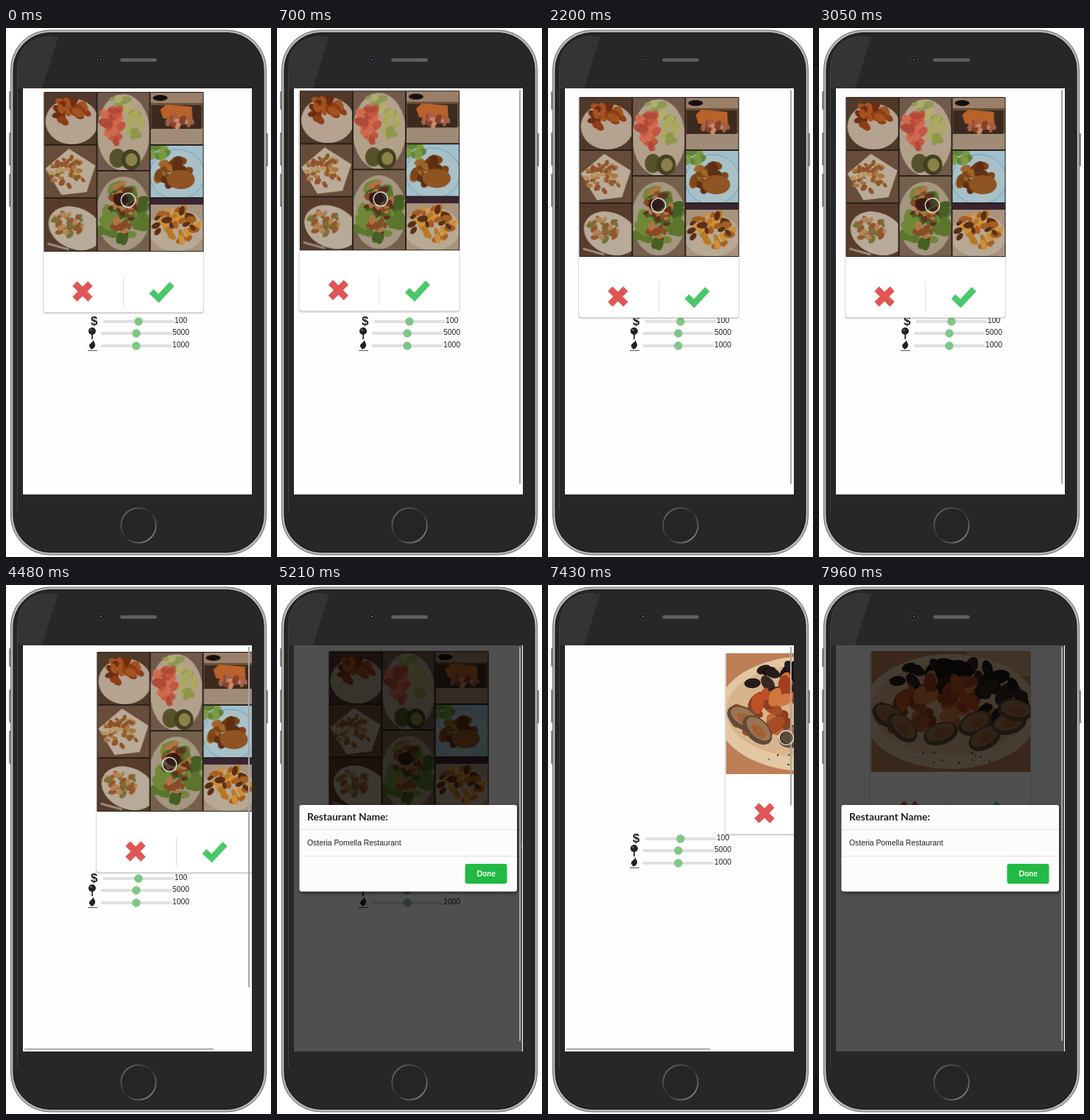
Animation of 360x719 px, one loop 8 s. Source, as an HTML page:

```html
<!DOCTYPE html>
<html lang="en">
<head>
<meta charset="utf-8">
<title>Swipe cards</title>
<style>
  html, body { margin: 0; width: 100%; height: 100%; overflow: hidden; background: #fff; }
  svg { display: block; }
  text { font: 10.4px "Liberation Sans", Arial, sans-serif; fill: #222; }
  .bold { font: bold 13.8px Lato, sans-serif; }
</style>
</head>
<body>
<svg id="stage" width="360" height="719" viewBox="0 0 360 719"></svg>
<script>
const LOOP = 8000, DIM = 0.69, REST_X = 69;
const SECOND_CARD = 6160;

// Shape helpers
const rect = (x, y, w, h, fill, more = '') =>
  `<rect x="${x}" y="${y}" width="${w}" height="${h}" fill="${fill}" ${more}/>`;
const oval = (x, y, rx, ry, fill, more = '') =>
  `<ellipse cx="${x}" cy="${y}" rx="${rx}" ry="${ry}" fill="${fill}" ${more}/>`;
const path = (d, stroke, width, more = '') =>
  `<path d="${d}" fill="none" stroke="${stroke}" stroke-width="${width}" ${more}/>`;
const cell = (x, y, w, h, bg, content) =>
  `<svg x="${x}" y="${y}" width="${w}" height="${h}">${rect(0, 0, w, h, bg)}${content}
   ${rect(0, 0, w, h, 'none', 'stroke="#2a211c" stroke-width="2"')}</svg>`;

let seed = 7;
const random = () => (seed = seed * 16807 % 2147483647) / 2147483647;

// Scatters n irregular morsels inside an ellipse
function food(n, cx, cy, rx, ry, size, ...colors) {
  let out = '';
  for (let i = 0; i < n; i++) {
    const a = random() * 6.283, d = Math.sqrt(random());
    const x = cx + Math.cos(a) * rx * d, y = cy + Math.sin(a) * ry * d;
    const s = size * (0.7 + random() * 0.6);
    out += oval(x.toFixed(1), y.toFixed(1), s.toFixed(1), (s * 0.6).toFixed(1), colors[i % colors.length],
      `transform="rotate(${Math.round(random() * 180)} ${x.toFixed(1)} ${y.toFixed(1)})"`);
  }
  return out;
}

const platters = () =>
  cell(0, 0, 72, 72, '#4f392b',
    oval(38, 40, 36, 31, '#b5a291') + food(24, 35, 28, 24, 17, 8, '#8c3f17', '#a4521f', '#6f2d10')) +
  cell(72, 0, 72, 107, '#70594a',
    oval(36, 55, 36, 52, '#b3a08a') + food(14, 30, 18, 14, 12, 6, '#8d9a52', '#b3ad6c') +
    food(24, 22, 48, 15, 24, 8, '#c4553f', '#d06b50', '#b04a38') +
    food(12, 52, 48, 9, 20, 7, '#8f9648', '#a9aa5c') +
    oval(28, 90, 11, 13, '#55512a') + oval(46, 92, 13, 14, '#424020') + oval(47, 92, 8, 9, '#8b8148')) +
  cell(144, 0, 73, 72, '#66503a',
    rect(0, 0, 73, 15, '#9a806a') + oval(14, 8, 10, 4, '#15100e') + oval(38, 62, 44, 20, '#a08b76') +
    rect(2, 18, 68, 32, '#3b2a1d') + '<path d="M14 24 22 17 57 20 58 38 18 36Z" fill="#b9622a"/>' +
    food(22, 38, 42, 20, 9, 5, '#a85e45', '#c98b67', '#854229')) +
  cell(0, 72, 72, 72, '#674c39',
    '<path d="M2 32 34 5 70 28 58 64 24 68Z" fill="#baab98"/>' +
    food(48, 34, 37, 26, 20, 4, '#a8763f', '#8a5a2c', '#b99359', '#94502b')) +
  cell(144, 72, 73, 72, '#9fc0cd',
    oval(37, 40, 37, 34, '#a8c1c8', 'stroke="#7b9cab"') + food(8, 12, 10, 12, 10, 7, '#5f8439', '#7c9a44') +
    food(18, 31, 37, 20, 21, 9, '#7d4518', '#a0642a', '#5d3013') + oval(42, 47, 19, 13, '#8e5422')) +
  cell(0, 144, 72, 73, '#573c2c',
    oval(43, 40, 38, 28, '#b8aa98', 'transform="rotate(24 40 40)"') +
    food(38, 34, 34, 21, 16, 5, '#93562e', '#777039', '#b38353') +
    path('M5 62 34 70', '#98897b', 3)) +
  cell(72, 107, 72, 110, '#75604c',
    oval(36, 58, 37, 50, '#a49680') + food(38, 37, 60, 30, 40, 11, '#5c752e', '#6f8838', '#465e23') +
    food(42, 35, 50, 19, 36, 5, '#8a4a25', '#b17346', '#60311d') + oval(32, 39, 10, 9, '#3b1a10')) +
  cell(144, 144, 73, 73, '#a8937c',
    rect(0, 0, 73, 9, '#392531') + oval(36, 44, 38, 29, '#b8a995') +
    food(44, 36, 37, 29, 23, 6, '#b97824', '#cd9038', '#5a2f14', '#a75d1f'));

const shellfish = () => `<svg width="217" height="164">` +
  rect(0, 0, 217, 164, '#bd7f56') + rect(130, 0, 87, 34, '#d4a57b') +
  oval(108, 82, 121, 78, '#e3c6a3') + oval(108, 78, 108, 63, '#d8b48c') +
  food(44, 100, 38, 80, 24, 13, '#241b19', '#382822', '#17110f') +
  food(30, 105, 85, 92, 30, 13, '#a64d26', '#bd6a38', '#8b3e1f') +
  food(20, 95, 61, 62, 26, 12, '#bd5125', '#cf773e', '#a33f1c') +
  food(12, 175, 67, 34, 28, 14, '#342620', '#211917') +
  [[24, 88, 30], [43, 104, 45], [95, 112, -20], [142, 98, -25], [155, 118, -30], [188, 98, -15], [196, 80, 10]]
    .map(([x, y, r]) => `<g transform="rotate(${r} ${x} ${y})">${oval(x, y, 24, 15, '#5f4b38')}` +
      `${oval(x, y - 2, 20, 11, '#9b7552')}${oval(x + 2, y, 12, 6, '#a65f34')}</g>`).join('') +
  food(12, 110, 145, 65, 9, 1.5, '#46392a') + '</svg>';

const card = (id, photo, photoHeight) => `<g id="${id}">
  ${rect(0, 1.5, 219, photoHeight + 84, '#000', 'rx="4" opacity=".16"')}
  ${rect(0.5, 0.5, 218, photoHeight + 83, '#fff', 'rx="4" stroke="#d8d8d8"')}
  <g transform="translate(1.5 1)" filter="url(#soft)">${photo}</g>
  <g transform="translate(0 ${photoHeight + 55})">
    ${rect(109, -20, 1, 41, '#ddd')}
    ${path('M43.5-10.5l21 21m0-21l-21 21', '#e15554', 9)}
    ${path('M147.5 0l10 9.5 18-19.5', '#4bc76b', 8.6)}
  </g></g>`;

const slider = (x, y, label) =>
  rect(x, y - 2, 96, 4, '#e0e0e0', 'rx="1"') + oval(x + 48, y, 5.7, 5.7, '#7fc784') +
  `<text x="${x + 97}" y="${y + 2}">${label}</text>`;

const phone = () =>
  [[4, 86, 25], [4, 142, 45], [4, 198, 45], [352.5, 143, 45]]
    .map(([x, y, h]) => rect(x, y, 3.5, h, '#858585', 'rx="1"')).join('') +
  rect(6.5, 3, 347, 713, '#b4b4b4', 'rx="53" stroke="#6c6c6c"') +
  rect(10, 6.5, 340, 706, '#272727', 'rx="50" stroke="#111"') +
  '<path d="M16 82V58Q16 12 62 12H71L49 82Z" fill="#343434"/>' +
  path('M15.5 655V58Q16 12 62 11.5', '#424242', 1) +
  oval(129, 43, 4, 4, '#15171d', 'stroke="#3a3a42"') + oval(129, 43, 1.3, 1.3, '#56607d') +
  rect(155, 41, 50, 5, '#555', 'rx="2.5"') +
  path('M157 43.5H204', '#777', 2, 'stroke-dasharray="1 1"') +
  oval(180, 676, 23.7, 23.7, '#252525', 'stroke="url(#home)" stroke-width="1.8"');

const stage = document.getElementById('stage');
stage.innerHTML = `<defs>
  <clipPath id="screen">${rect(23, 82, 311, 552, '#fff')}</clipPath>
  <filter id="soft" x="0" y="0" width="1" height="1"><feGaussianBlur stdDeviation=".55"/></filter>
  <filter id="shadow"><feDropShadow dx="1" dy="2" stdDeviation="2" flood-opacity=".6"/></filter>
  <linearGradient id="home" x2="1" y2="1">
    <stop stop-color="#777"/><stop offset=".5" stop-color="#2b2b2b"/><stop offset="1" stop-color="#999"/>
  </linearGradient></defs>
  ${phone()}
  <g clip-path="url(#screen)">
    ${rect(23, 82, 311, 552, '#fefefe')}
    <g id="sliders">
      <text x="115" y="404" style="font-size:17px;font-weight:bold">$</text>
      ${oval(117, 412, 5, 5, '#222')}${oval(115.5, 410.5, 1.3, 1.3, '#777')}${rect(116.3, 416, 1.7, 7, '#222')}
      <path d="M119 424c0 4 3 4 2 8s-4 4-6 5c1-3-2-2-2-5s4-4 6-8Z" fill="#222"/>${rect(111, 438, 13, 1, '#555')}
      ${slider(132, 399, 100)}${slider(129, 415, 5000)}${slider(129, 432, 1000)}
    </g>
    ${card('first', platters(), 217)}${card('second', shellfish(), 163)}
    ${rect(23, 82, 310, 552, '#000', 'id="dim"')}
    <g id="modal" filter="url(#shadow)">
      ${rect(30.5, 299, 295.5, 117.5, '#fcfcfc', 'rx="3"')}
      ${rect(30.5, 332, 295.5, 1, '#e2e2e2')}${rect(30.5, 368, 295.5, 1, '#e2e2e2')}
      <text class="bold" x="41" y="320">Restaurant Name:</text>
      <text x="41" y="353.5">Osteria Pomella Restaurant</text>
      ${rect(255.5, 379, 57, 27, '#21ba45', 'rx="3"')}
      <text class="bold" x="284" y="396.3" text-anchor="middle" style="font-size:10.6px;fill:#fff">Done</text>
    </g>
    ${rect(329, 84, 2, 536, '#a5a5a5', 'id="vbar" rx="1"')}
    ${rect(25, 629.5, 300, 2.5, '#b5b5b5', 'id="hbar" rx="1"')}
    ${oval(0, 0, 9.7, 9.7, 'rgba(30,30,30,.5)', 'id="cursor" stroke="rgba(255,255,255,.8)" stroke-width="1.5"')}
  </g>`;

const part = Object.fromEntries([...stage.querySelectorAll('[id]')].map(e => [e.id, e]));
const move = (el, x, y) => el.setAttribute('transform', `translate(${x} ${y})`);
const show = (el, on) => el.setAttribute('visibility', on ? 'visible' : 'hidden');

// Bursts of movement: start, end, number of steps
const BURSTS = [[150, 1120, 8], [1240, 2200, 8], [2330, 3050, 6], [3330, 3450, 2], [3870, 3990, 2],
  [4360, 4910, 5], [5210, 5730, 5], [6160, 6890, 6], [7160, 7960, 7]];

function stepTime(t) {
  const burst = BURSTS.findLast(b => b[0] <= t);
  if (!burst) return 0;
  const [start, end, steps] = burst, gap = (end - start) / (steps - 1);
  return Math.min(end, start + Math.floor((t - start) / gap + 0.2) * gap);
}

// Keys: time followed by values, eased between neighbours
const CARD = [[0, 50, 86], [450, 15, 85], [1240, 74, 82], [1620, 113, 86], [2200, 41, 93], [2400, 20, 93],
  [2760, 95, 93], [3050, 35, 93], [3450, 69, 89], [4220, 69, 89], [4497, 122, 90], [4635, 240, 92],
  [4772, 69, 89], [7030, 69, 89], [7293, 122, 90], [7427, 240, 92], [7560, 69, 89]];
const CURSOR = [[0, 166, 234], [450, 128, 233], [1240, 180, 231], [1620, 218, 235], [2200, 150, 241],
  [2400, 134, 241], [2760, 207, 241], [3050, 154, 241], [3750, 154, 241], [3990, 173, 245], [4220, 173, 245],
  [4497, 222, 244], [4700, 350, 246], [5080, 350, 350], [5730, 281, 389], [6160, 281, 389],
  [6890, 165, 205], [7030, 165, 205], [7293, 217, 206], [7480, 350, 208]];
const FADE = [[4635, 0], [4910, 1], [6159, 1], [6160, 0], [7560, 0], [7830, 1]];

function at(keys, t) {
  const next = keys.findIndex(k => k[0] > t);
  if (next === 0) return keys[0].slice(1);
  if (next < 0) return keys.at(-1).slice(1);
  const a = keys[next - 1], b = keys[next];
  const u = (t - a[0]) / (b[0] - a[0]), ease = u * u * (3 - 2 * u);
  return a.slice(1).map((v, i) => v + (b[i + 1] - v) * ease);
}

function draw(now) {
  const t = stepTime(now % LOOP), second = t >= SECOND_CARD;
  const [x, y] = at(CARD, t), [fade] = at(FADE, t), dx = x - REST_X;

  show(part.first, !second);
  show(part.second, second);
  move(second ? part.second : part.first, x, y);
  move(part.sliders, 0, second ? -54 : 0);
  move(part.cursor, ...at(CURSOR, t));

  part.dim.setAttribute('opacity', fade * DIM);
  part.modal.setAttribute('opacity', fade);
  const scale = 0.9 + 0.1 * fade;
  part.modal.setAttribute('transform', `translate(178 358) scale(${scale}) translate(-178 -358)`);

  const right = Math.max(0, dx);
  part.vbar.setAttribute('height', Math.max(216, 536 - 0.5 * right - 0.0166 * right * right));
  part.hbar.setAttribute('width', 309 * 311 / (320.5 + right));
  show(part.vbar, t >= 150 && t < 3450 || t >= 4360 && t < 5600 || t >= 7160);
  show(part.hbar, dx > 0.5);
  requestAnimationFrame(draw);
}
const begin = performance.now();
const tick = draw;
draw = now => tick(Math.max(0, now - begin));
draw(begin);
</script>
</body>
</html>
```
